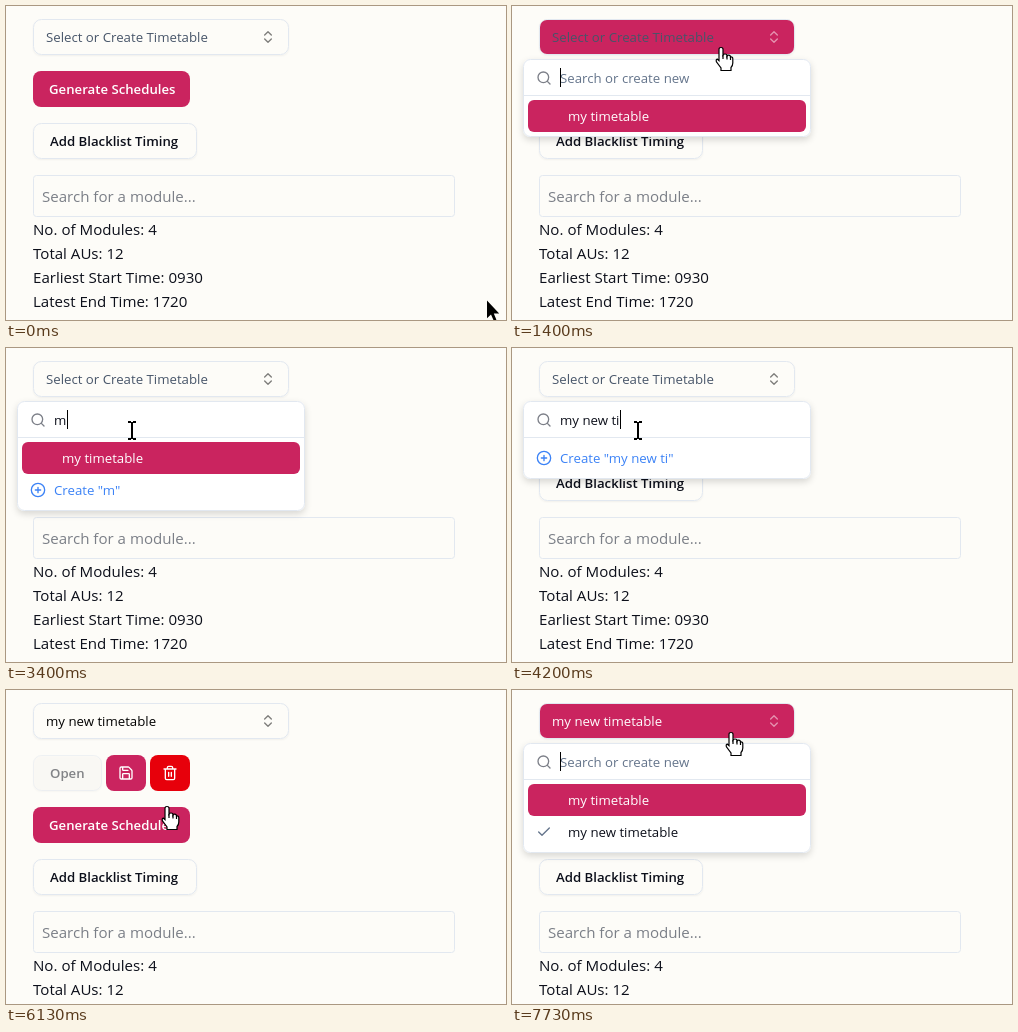
Animation, 500 px wide and 314 px high, one loop 8000 ms. Source, as an HTML page with a canvas:

```html
<!DOCTYPE html>
<html lang="en">
<head>
<meta charset="utf-8">
<title>Timetable picker</title>
<style>
  html, body { margin: 0; width: 100%; height: 100%; overflow: hidden; background: #fdfcf8; }
  canvas { display: block; width: 500px; height: 314px; }
</style>
</head>
<body>
<canvas id="stage" width="500" height="314"></canvas>
<script>
const ctx = document.getElementById('stage').getContext('2d');
const LOOP = 8000, TICK = 1000 / 15;

const PAGE = '#fdfcf8', PINK = '#ca245f', RED = '#e7000b', INK = '#0c0f1a';
const LINE = '#e2e8f0', MUTED = '#64748b', BLUE = '#3b82f6';
const FAMILY = '"Open Sans", "Noto Sans", sans-serif';
const SMALL = `13.24px ${FAMILY}`, BODY = `15.08px ${FAMILY}`, BOLD = `600 13.2px ${FAMILY}`;

const NAME = 'my new timetable';
const KEYS = [3400, 3470, 3530, 3730, 3800, 3870, 4000, 4130, 4200, 4270, 4330,
  4470, 4530, 4600, 4730, 4800];
const PICKED = 6000;

const ICONS = {
  chevrons: 'M7 15l5 5 5-5M7 9l5-5 5 5',
  search: 'M19 11a8 8 0 1 1-16 0a8 8 0 1 1 16 0M21 21l-4.3-4.3',
  plus: 'M22 12a10 10 0 1 1-20 0a10 10 0 1 1 20 0M8 12h8M12 8v8',
  check: 'M20 6L9 17l-5-5',
  save: 'M15.2 3a2 2 0 0 1 1.4.6l3.8 3.8a2 2 0 0 1 .6 1.4V19a2 2 0 0 1-2 2H5a2 2 0 0 1-2-2V5a2 2 0 0 1 2-2z' +
    'M17 21v-7a1 1 0 0 0-1-1H8a1 1 0 0 0-1 1v7M7 3v4a1 1 0 0 0 1 1h7',
  trash: 'M3 6h18M19 6v14a2 2 0 0 1-2 2H7a2 2 0 0 1-2-2V6M8 6V4a2 2 0 0 1 2-2h4a2 2 0 0 1 2 2v2M10 11v6M14 11v6'
};

// time, x, y, pointer shape until the next stop
const PATH = [
  [0, 481, 295, 'arrow'], [270, 384, 207, 'beam'], [470, 384, 207, 'beam'],
  [600, 317, 145, 'arrow'], [800, 213, 47, 'hand'], [1000, 209, 41, 'hand'],
  [1470, 209, 41, 'hand'], [1600, 186, 53, 'beam'], [1930, 129, 82, 'beam'],
  [2270, 129, 82, 'beam'], [2330, 128, 80, 'beam'], [2600, 128, 80, 'beam'],
  [2670, 126, 82, 'beam'], [5270, 126, 82, 'beam'], [5530, 136, 94, 'hand'],
  [5600, 140, 97, 'hand'], [5730, 163, 120, 'hand'], [5930, 163, 120, 'hand'],
  [6000, 161, 116, 'hand'], [6730, 161, 116, 'hand'], [6800, 164, 116, 'hand'],
  [6930, 164, 116, 'hand'], [7000, 174, 102, 'arrow'], [7270, 215, 46, 'hand'],
  [7400, 219, 42, 'hand'], [LOOP, 219, 42, 'hand']
];

function ramp(t, start, span = 150) {
  const k = Math.min(1, Math.max(0, (t - start) / span));
  return k * k * (3 - 2 * k);
}

function box(x, y, w, h, r, fill, stroke) {
  ctx.beginPath();
  ctx.roundRect(x, y, w, h, r);
  if (fill) { ctx.fillStyle = fill; ctx.fill(); }
  if (stroke) {
    ctx.shadowColor = 'transparent';
    ctx.beginPath();
    ctx.roundRect(x + 0.5, y + 0.5, w - 1, h - 1, r);
    ctx.strokeStyle = stroke;
    ctx.lineWidth = 1;
    ctx.stroke();
  }
}

function shaded(alpha, blur, dy, draw) {
  ctx.save();
  ctx.shadowColor = `rgba(0,0,0,${alpha})`;
  ctx.shadowBlur = blur;
  ctx.shadowOffsetY = dy;
  draw();
  ctx.restore();
}

function text(str, x, y, color = INK, font = SMALL) {
  ctx.font = font;
  ctx.fillStyle = color;
  ctx.fillText(str, x, y);
}

function icon(name, cx, cy, color, alpha = 1) {
  ctx.save();
  ctx.globalAlpha *= alpha;
  ctx.translate(cx - 8, cy - 8);
  ctx.scale(2 / 3, 2 / 3);
  ctx.strokeStyle = color;
  ctx.lineWidth = 2;
  ctx.lineCap = ctx.lineJoin = 'round';
  ctx.stroke(new Path2D(ICONS[name]));
  ctx.restore();
}

function outlineButton(x, y, w, h, label) {
  shaded(0.05, 2, 1, () => box(x, y, w, h, 8, PAGE, LINE));
  text(label, x + 17, y + h / 2 + 5, INK, BOLD);
}

function drawSelect(t) {
  const hover = ramp(t, 800) - ramp(t, 1540) + ramp(t, 7250);
  const picked = t >= PICKED;
  shaded(0.05, 2, 1, () => box(27, 13, 256, 36, 8, PAGE, LINE));
  ctx.save();
  ctx.globalAlpha = hover;
  box(28, 14, 254, 34, 7, PINK);
  ctx.restore();
  const shade = Math.round(255 * hover);
  const front = `rgb(${shade},${shade},${shade})`;
  text(picked ? NAME : 'Select or Create Timetable', 40, 36, picked ? front : '#475569');
  icon('chevrons', 262, 31, front, 0.5);
}

function drawPage(t) {
  ctx.fillStyle = PAGE;
  ctx.fillRect(0, 0, 500, 314);
  drawSelect(t);
  ctx.save();
  if (t >= PICKED) {
    ctx.globalAlpha = 0.5;
    outlineButton(27, 65, 69, 36, 'Open');
    ctx.globalAlpha = 1;
    box(100, 65, 40, 36, 8, PINK);
    icon('save', 120, 83, '#fff');
    box(144, 65, 40, 36, 8, RED);
    icon('trash', 164, 83, '#fff');
    ctx.translate(0, 52);
  }
  box(27, 65, 157, 36, 8, PINK);
  text('Generate Schedules', 43, 88, '#fff', BOLD);
  outlineButton(27, 117, 164, 36, 'Add Blacklist Timing');
  box(27, 169, 422, 42, 3, PAGE, LINE);
  text('Search for a module...', 36, 196, '#7b7f87', BODY);
  ['No. of Modules: 4', 'Total AUs: 12', 'Earliest Start Time: 0930',
    'Latest End Time: 1720', 'Show blacklisted: 4/20']
    .forEach((line, i) => text(line, 27, 229 + 24 * i, INK, BODY));
  ctx.restore();
}

function caretOn(t) {
  if (t >= 7500) return true;
  if (t >= 3400) return t < 5330;
  return t < 1800 || (t >= 2330 && t < 2870);
}

function drawPopover(t) {
  const again = t > 7500;
  const show = again ? ramp(t, 7580) : ramp(t, 1250) - ramp(t, 5970);
  if (show <= 0) return;

  const typed = again ? '' : NAME.slice(0, KEYS.filter(k => k <= t).length);
  const rows = [];
  if ('my timetable'.startsWith(typed.trim())) rows.push('match');
  if (typed) rows.push('create');
  if (again) rows.push('current');
  const height = 46 + 32 * rows.length;

  ctx.save();
  ctx.globalAlpha = show;
  const cx = 155, cy = 53 + height / 2, zoom = 0.95 + 0.05 * show;
  ctx.translate(cx, cy - 8 * (1 - show));
  ctx.scale(zoom, zoom);
  ctx.translate(-cx, -cy);

  shaded(0.15, 7, 3, () => box(11, 53, 288, height, 7, '#fff', LINE));
  icon('search', 32, 72, '#7c7f88');
  ctx.fillStyle = LINE;
  ctx.fillRect(12, 89, 286, 1);
  text(typed || 'Search or create new', 48, 77, typed ? INK : MUTED);
  if (caretOn(t)) {
    const x = 48 + Math.ceil(ctx.measureText(typed).width);
    ctx.fillStyle = '#000';
    ctx.fillRect(x, 62, 1, 19);
  }

  rows.forEach((row, i) => {
    const y = 94 + 32 * i;
    if (row === 'match') {
      box(16, y, 278, 32, 6, PINK);
      text('my timetable', 56, y + 21, '#fff');
    } else if (row === 'create') {
      if (t >= 5530) box(16, y, 282, 32, 6, '#bfdbfe');
      icon('plus', 32, y + 16, BLUE);
      text(`Create "${typed}"`, 48, y + 21, BLUE);
    } else {
      icon('check', 32, y + 16, MUTED);
      text(NAME, 56, y + 21);
    }
  });
  ctx.restore();
}

const POINTERS = {
  arrow() {
    const p = new Path2D('M0 -.5V17.2L4 13.5L6.8 19.8L9.4 18.8L6.8 12.6H12.2Z');
    ctx.fillStyle = '#000';
    ctx.fill(p);
  },
  hand() {
    const p = new Path2D('M-2 2.3Q-2 .5 0 .5Q2 .5 2 2.3V8Q2.5 7 4 7Q6 7 6 9Q6.5 8 8 8.2Q9.5 8.5 9.5 10' +
      'Q11.8 9.5 11.8 11.8V16Q11.8 18.5 10 20.5V23.5H0V21L-4.6 14.8Q-5.3 12.2-3.5 12.2L-2 13.6Z');
    ctx.fillStyle = '#fff';
    ctx.fill(p);
    ctx.strokeStyle = '#000';
    ctx.lineWidth = 1.2;
    ctx.stroke(p);
    ctx.stroke(new Path2D('M2 8V12M6 9V12.5M9.5 10V13'));
  },
  beam() {
    ctx.fillStyle = '#000';
    ctx.fillRect(-1, -8, 2, 17);
    for (const y of [-9, 8]) {
      ctx.fillRect(-4, y, 3, 2);
      ctx.fillRect(1, y, 3, 2);
    }
  }
};

function drawPointer(t) {
  const i = PATH.findIndex(stop => stop[0] > t) - 1;
  const [t0, x0, y0, shape] = PATH[i], [t1, x1, y1] = PATH[i + 1];
  const k = (t - t0) / (t1 - t0);
  ctx.save();
  ctx.translate(Math.round(x0 + (x1 - x0) * k), Math.round(y0 + (y1 - y0) * k));
  POINTERS[shape]();
  ctx.restore();
}

const start = performance.now();

function render() {
  const now = (performance.now() - start) % LOOP;
  // the screen updates 15 times a second
  const t = Math.round(Math.floor((now + 5) / TICK) * TICK / 10) * 10 % LOOP;
  drawPage(t);
  drawPopover(t);
  drawPointer(t);
  requestAnimationFrame(render);
}
render();
</script>
</body>
</html>
```
